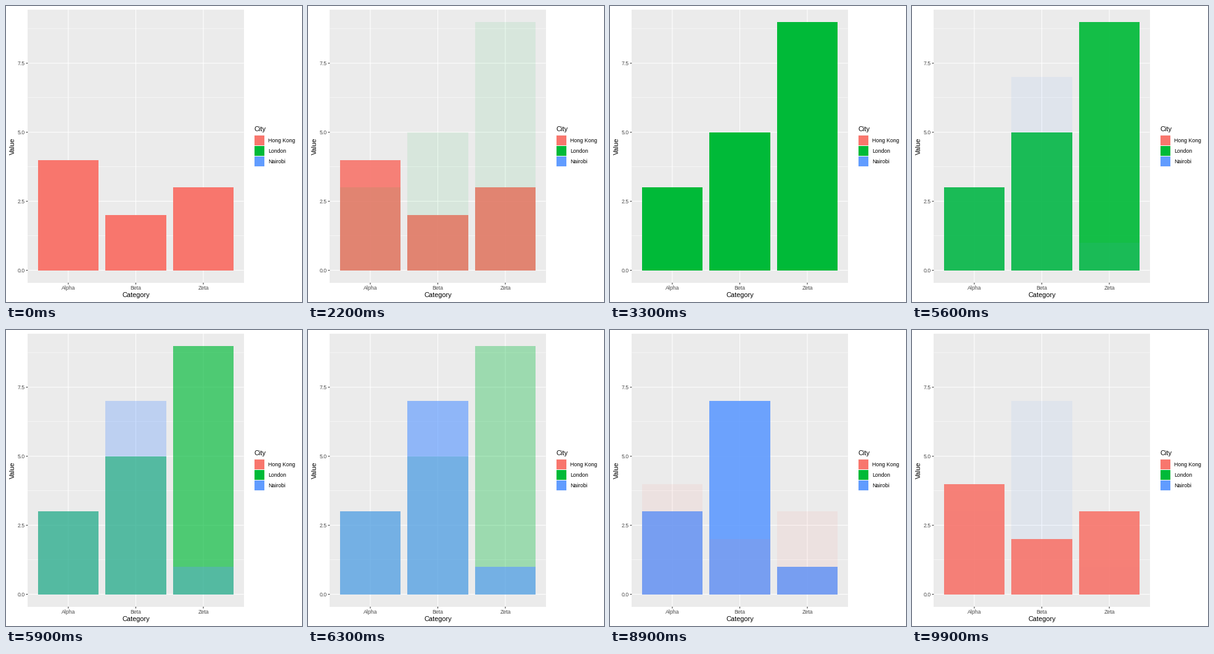
These frames come from a looping animation (480x480 px, 10 s). A matplotlib script:

```python
import matplotlib.pyplot as plt
from matplotlib.animation import FuncAnimation
from matplotlib.patches import Rectangle

plt.rcParams["font.family"] = "Liberation Sans"

SIZE = 480
FRAMES = 100
FADE = 12                      # frames per cross-fade
FADE_ENDS = (33, 67, 100)      # frame at which each city has fully handed over

CITIES = {
    "Hong Kong": ("#F8766D", (4, 2, 3)),
    "London": ("#00BA38", (3, 5, 9)),
    "Nairobi": ("#619CFF", (3, 7, 1)),
}
CATEGORIES = ("Alpha", "Beta", "Zeta")

LEFT, RIGHT, TOP, BOTTOM = 35.3, 385.7, 5.5, 448.75
STEP_X = (RIGHT - LEFT) / 3.2
STEP_Y = (BOTTOM - TOP) / 9.9
LINE = 1.067
TICK = 2.75

fig = plt.figure(figsize=(SIZE / 72, SIZE / 72), dpi=72, facecolor="white")
ax = fig.add_axes([0, 0, 1, 1])
ax.set(xlim=(0, SIZE), ylim=(SIZE, 0))
ax.axis("off")


def px(i):
    return LEFT + (i + 0.6) * STEP_X


def py(value):
    return BOTTOM - (value + 0.45) * STEP_Y


def block(x0, y0, x1, y1, color, z=1):
    """Filled rectangle with crisp pixel edges."""
    x0, y0, x1, y1 = (round(v) for v in (x0, y0, x1, y1))
    return ax.add_patch(Rectangle((x0, y0), x1 - x0, y1 - y0, facecolor=color,
                                  linewidth=0, antialiased=False, zorder=z))


def line(x0, y0, x1, y1, color="white", width=LINE):
    ax.plot([x0, x1], [y0, y1], color=color, lw=width, zorder=2,
            solid_capstyle="butt", snap=False)


def label(x, y, text, size=8.8, color="black", ha="left", **kw):
    ax.text(x, y, text, fontsize=size, color=color, ha=ha, va="baseline", **kw)


def draw_panel():
    block(LEFT, TOP, RIGHT, BOTTOM, "#EBEBEB")
    for value in (1.25, 3.75, 6.25, 8.75):
        line(LEFT, py(value), RIGHT, py(value), width=LINE / 2)
    for value in (0, 2.5, 5, 7.5):
        y = py(value)
        line(LEFT, y, RIGHT, y)
        line(LEFT - TICK, y, LEFT, y, "#333333")
        label(30.3, round(y + 3.2), f"{value:.1f}", color="#4D4D4D", ha="right")
    for i, name in enumerate(CATEGORIES):
        x = px(i)
        line(x, TOP, x, BOTTOM)
        line(x, BOTTOM, x, BOTTOM + TICK, "#333333")
        label(x, 460, name, color="#4D4D4D", ha="center")
    label((LEFT + RIGHT) / 2, 472, "Category", 11, ha="center")
    ax.text(14, 227, "Value", fontsize=11, rotation=90, ha="center",
            va="center", rotation_mode="anchor").set(va="baseline")


def draw_legend():
    key, x = 17.28, 402.2
    label(x, 203, "City", 11)
    for i, (name, (color, _)) in enumerate(CITIES.items()):
        y = 209.06 + i * key
        block(x, y, x + key, y + key, "#F2F2F2")
        ax.add_patch(Rectangle((x, y), key, key, fill=False, edgecolor="white",
                               linewidth=LINE, snap=False, zorder=2))
        block(x + 0.71, y + 0.71, x + key - 0.71, y + key - 0.71, color, 3)
        label(425, round(y + key / 2 + 3.1), name)


def make_bars(color, values):
    half = 0.45 * STEP_X
    return [block(px(i) - half, py(v), px(i) + half, py(0), color)
            for i, v in enumerate(values)]


draw_panel()
draw_legend()
bars = [make_bars(*city) for city in CITIES.values()]


def update(frame):
    stage = next(i for i, end in enumerate(FADE_ENDS) if frame < end)
    entering = (stage + 1) % len(bars)
    t = max(0, 1 - (FADE_ENDS[stage] - frame) / FADE)
    for i, group in enumerate(bars):
        alpha = {stage: 1 - t, entering: t}.get(i, 0)
        for bar in group:
            bar.set_alpha(alpha)
            bar.set_visible(alpha > 0)
            bar.set_zorder(5 if i == entering else 4)
    return [bar for group in bars for bar in group]


anim = FuncAnimation(fig, update, frames=FRAMES, interval=100,
                     repeat=True, repeat_delay=0, blit=False)
plt.show()
```
